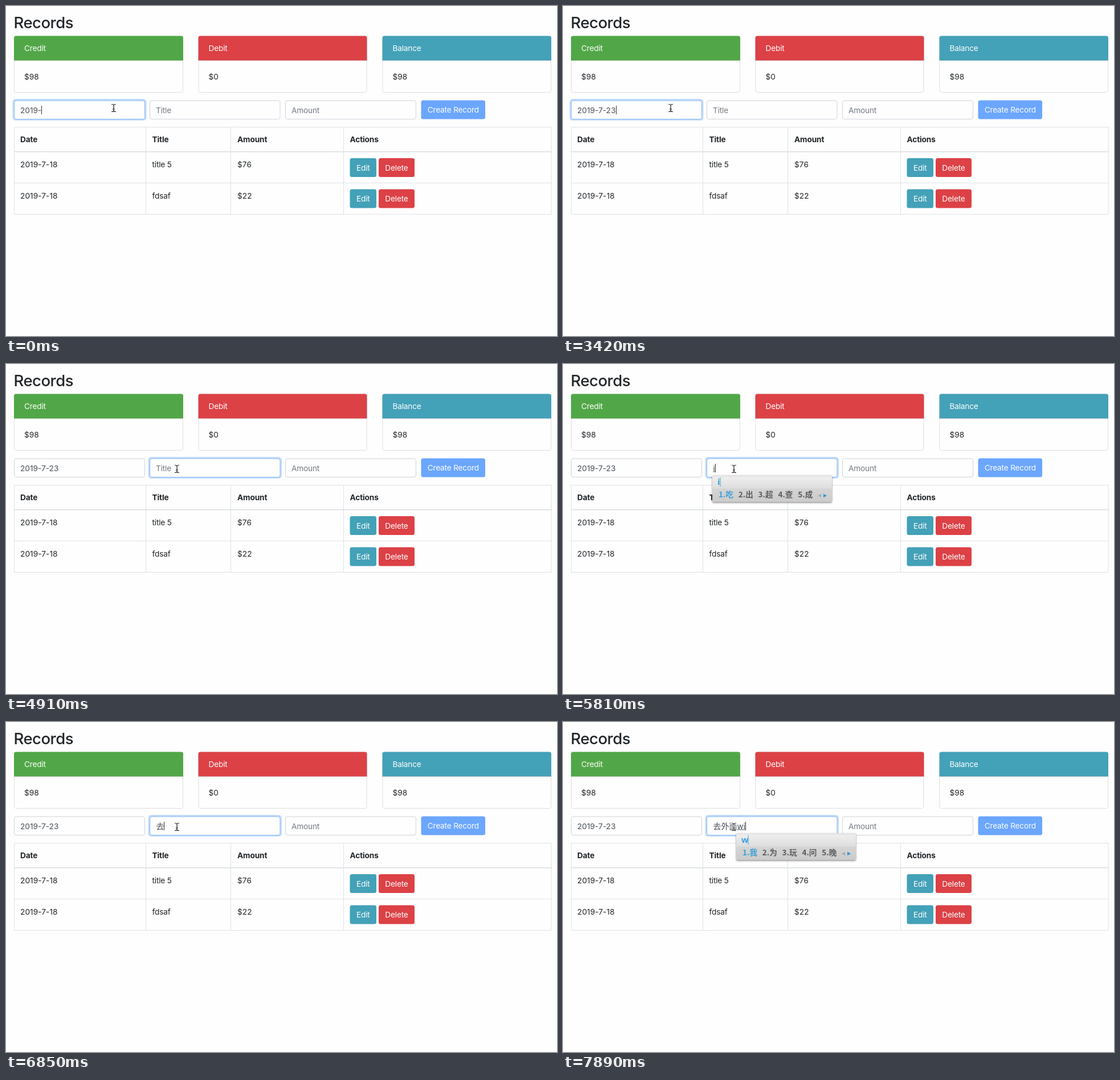
An HTML page that plays this animation: 967 by 579 pixels, repeating every 8 s.

```html
<!DOCTYPE html>
<html lang="en">
<head>
<meta charset="utf-8">
<title>Records</title>
<style>
  html, body { margin: 0; width: 100%; height: 100%; overflow: hidden; background: #fefefe; }
  svg { display: block; width: 100vw; height: 100vh; }
  text { font: 400 13.7px Inter, "Noto Sans CJK SC", "Noto Sans CJK", sans-serif; letter-spacing: -.2px; fill: #212529; white-space: pre; }
  .h1 { font-size: 27.5px; font-weight: 500; letter-spacing: -.5px; }
  .num { letter-spacing: .05px; }
  .th { font-weight: 700; letter-spacing: -.15px; }
  .on { fill: #fefefe; }
  .mid { text-anchor: middle; }
  .field { fill: #495057; letter-spacing: 0; }
  .hint { fill: #757b82; }
  .cjk { font: 400 14px "Noto Sans CJK SC", "Noto Sans CJK", sans-serif; letter-spacing: 0; fill: #495057; }
  .code { font: 700 14.5px "Noto Sans", sans-serif; letter-spacing: 0; fill: #3a9fd6; }
  .pick { font: 700 13.6px "Noto Sans CJK SC", "Noto Sans CJK", sans-serif; letter-spacing: 0; fill: #5c5c5c; }
  .pick.first { fill: #3a9fd6; }
</style>
</head>
<body>
<svg id="stage" viewBox="0 0 967 579">
  <defs>
    <linearGradient id="gloss" x1="0" y1="0" x2="0" y2="1">
      <stop offset="0" stop-color="#e2e2e2"/>
      <stop offset=".1" stop-color="#ededed"/>
      <stop offset=".48" stop-color="#dedede"/>
      <stop offset=".52" stop-color="#d4d4d4"/>
      <stop offset="1" stop-color="#cbcbcb"/>
    </linearGradient>
    <filter id="shade" x="-10%" y="-20%" width="120%" height="150%">
      <feDropShadow dx="0" dy="1.5" stdDeviation="1.5" flood-color="#000" flood-opacity=".45"/>
    </filter>
  </defs>
  <g id="page"></g>
  <g id="form"></g>
  <g id="popup"></g>
  <g id="mouse" fill="none" stroke-linecap="round">
    <path id="beam" stroke="#fff" stroke-width="2.6" d="M-3.5-6.5q3 0 3.5 1.5q.5-1.5 3.5-1.5M0-5V5M-3.5 6.5q3 0 3.5-1.5q.5 1.5 3.5 1.5M-1.6 2h3.2"/>
    <use href="#beam" style="stroke:#000"/>
    <path stroke="#1c1c1c" stroke-width="1.2" d="M-3.5-6.5q3 0 3.5 1.5q.5-1.5 3.5-1.5M0-5V5M-3.5 6.5q3 0 3.5-1.5q.5 1.5 3.5 1.5M-1.6 2h3.2"/>
  </g>
</svg>
<script>
const LOOP = 8000;
const GREEN = '#51a747', RED = '#dc4146', TEAL = '#43a1b8', BLUE = '#6ba6ff';
const $ = id => document.getElementById(id);

const text = (x, y, s, cls = '') => `<text x="${x}" y="${y}" class="${cls}">${s}</text>`;
const rect = (x, y, w, h, fill, extra = '') =>
  `<rect x="${x}" y="${y}" width="${w}" height="${h}" fill="${fill}" ${extra}/>`;
const line = (d, color, width = 1) =>
  `<path d="${d}" fill="none" stroke="${color}" stroke-width="${width}"/>`;

function card(x, w, color, title, value) {
  const r = x + w;
  return rect(x + .5, 53, w - 1, 98.5, '#fefefe', 'rx="3.5" stroke="#dfdfdf"') +
    `<path d="M${x} 95.5V56q0-3.5 3.5-3.5H${r - 3.5}q3.5 0 3.5 3.5V95.5Z" fill="${color}"/>` +
    line(`M${x} 95.5H${r}`, 'rgba(0,0,0,.125)') +
    text(x + 18, 79, title, 'on') + text(x + 18, 128.5, value, 'num');
}

function button(x, y, w, color, label) {
  return rect(x, y, w, 33, color, 'rx="3.5"') + text(x + w / 2, y + 21.7, label, 'on mid');
}

function row(y, cells) {
  return cells.map((s, i) => text([25, 256.5, 406][i], y + 27, s, i === 1 ? '' : 'num')).join('') +
    button(603.5, y + 11, 46.5, TEAL, 'Edit') + button(654, y + 11, 63, RED, 'Delete');
}

$('page').innerHTML = rect(0, 0, 967, 579, '#fefefe') +
  text(13.5, 39, 'Records', 'h1') +
  card(14, 297, GREEN, 'Credit', '$98') +
  card(337.5, 296, RED, 'Debit', '$0') +
  card(660.5, 296.5, TEAL, 'Balance', '$98') +
  button(728.5, 165.5, 112.5, BLUE, 'Create Record') +
  line('M14.5 212.5H957V365.5H14.5ZM245.5 212.5V365.5M394.5 212.5V365.5M592.5 212.5V365.5M14.5 310.5H957', '#dee2e6') +
  line('M14 255.6H957.5', '#dee2e6', 1.8) +
  ['Date', 'Title', 'Amount', 'Actions'].map((s, i) => text([25, 256.5, 406, 603.5][i], 239, s, 'th')).join('') +
  row(256, ['2019-7-18', 'title 5', '$76']) +
  row(310.5, ['2019-7-18', 'fdsaf', '$22']);

function input(x, w, focus) {
  return (focus ? rect(x - 2.5, 163, w + 5, 38, '#c4dcfb', 'rx="5.5"') : '') +
    rect(x + .5, 166, w - 1, 32.5, '#fefefe', `rx="3.5" stroke="${focus ? '#86b7f5' : '#ced4da'}"`);
}

const caret = x => rect(x, 175, 1, 15, '#333');

function form(s) {
  const start = 263.5 + 14 * s.done.length;
  const empty = !s.done && !s.typed;
  let out = input(14, 230, s.focus === 0) + input(252, 229.5, s.focus === 1) + input(490, 230, false) +
    text(25, 187.5, s.date, 'field num') + text(501, 187.5, 'Amount', 'hint');
  if (empty) out += text(263, 187.5, 'Title', 'hint');
  if (s.done) out += text(263.5, 187.5, s.done, 'cjk');
  if (s.typed) out += text(start, 187.5, s.typed, 'field') + line(`M${start} 189H${s.caret}`, '#495057');
  return out + (s.caret ? caret(s.caret) : '');
}

function popup(s) {
  if (!s.pop) return '';
  const [code, codeW, list] = s.pop;
  const words = list.split(' ');
  const x = 262 + 14 * s.done.length;
  const pitch = 34.8 + 13.6 * (words[0].length - 1);
  const w = 36 + 5 * pitch, r = x + w;
  return rect(x, 195, w, 47, 'url(#gloss)', 'rx="2" filter="url(#shade)"') +
    text(x + 9, 211.5, code, 'code') + rect(x + 9 + codeW, 199, 1, 16, '#3a9fd6') +
    words.map((c, i) => text(x + 11 + i * pitch, 233.5, `${i + 1}.${c}`, i ? 'pick' : 'pick first')).join('') +
    `<path d="M${r - 25} 231l6-3v6z" fill="#a9a9a9"/><path d="M${r - 9} 231l-6-3.3v6.6z" fill="#2f96dc"/>`;
}

// Each step changes part of the state and keeps the rest.
const CH = ['i', 4.5, '吃 出 超 查 成'];
const W = ['w', 11.5, '我 为 玩 问 晚'];
const steps = [
  [0, { date: '2019-', focus: 0, caret: 62, done: '', typed: '', pop: null, x: 189, y: 179 }],
  [290, { caret: 0 }],
  [890, { caret: 62 }],
  [1340, { caret: 0 }],
  [1640, { date: '2019-7', caret: 70 }],
  [2230, { date: '2019-7-', caret: 76 }],
  [2680, { caret: 0 }],
  [3130, { date: '2019-7-2', caret: 85 }],
  [3420, { date: '2019-7-23', caret: 93 }],
  [3870, { caret: 0 }],
  [4010, { x: 214, y: 180 }],
  [4160, { x: 276, y: 183 }],
  [4310, { x: 300, y: 184 }],
  [4460, { focus: 1, caret: 264 }],
  [4910, { caret: 0 }],
  [5210, { typed: 'i', caret: 267, pop: CH }],
  [5360, { typed: 'ii', caret: 270, pop: ['ii', 9, '吃 持 迟 尺 池'] }],
  [5810, { typed: 'i', caret: 267, pop: CH }],
  [5950, { typed: '', caret: 264, pop: null }],
  [6400, { typed: 'q', caret: 272, pop: ['q', 9.5, '去 起 前 请 七'] }],
  [6550, { typed: 'qu', caret: 280, pop: ['qu', 19, '去 取 区 曲 趣'] }],
  [6850, { done: '去', typed: '', caret: 277, pop: null }],
  [7150, { typed: 'wl', caret: 291.5, pop: W }],
  [7450, { typed: "wl'm", caret: 306, pop: ["wl'm", 33, '外面 外卖 外码 外贸 外貌'] }],
  [7740, { done: '去外面', typed: '', caret: 305.5, pop: null }],
  [7890, { typed: 'wi', caret: 320, pop: W }]
];

let shown = -1;
function draw(t) {
  const n = steps.filter(([at]) => at <= t).length;
  if (n === shown) return;
  shown = n;
  const s = Object.assign({}, ...steps.slice(0, n).map(([, change]) => change));
  $('form').innerHTML = form(s);
  $('popup').innerHTML = popup(s);
  $('mouse').setAttribute('transform', `translate(${s.x} ${s.y})`);
}

const begin = performance.now();
function tick() {
  draw((performance.now() - begin) % LOOP);
  requestAnimationFrame(tick);
}
tick();
</script>
</body>
</html>
```
